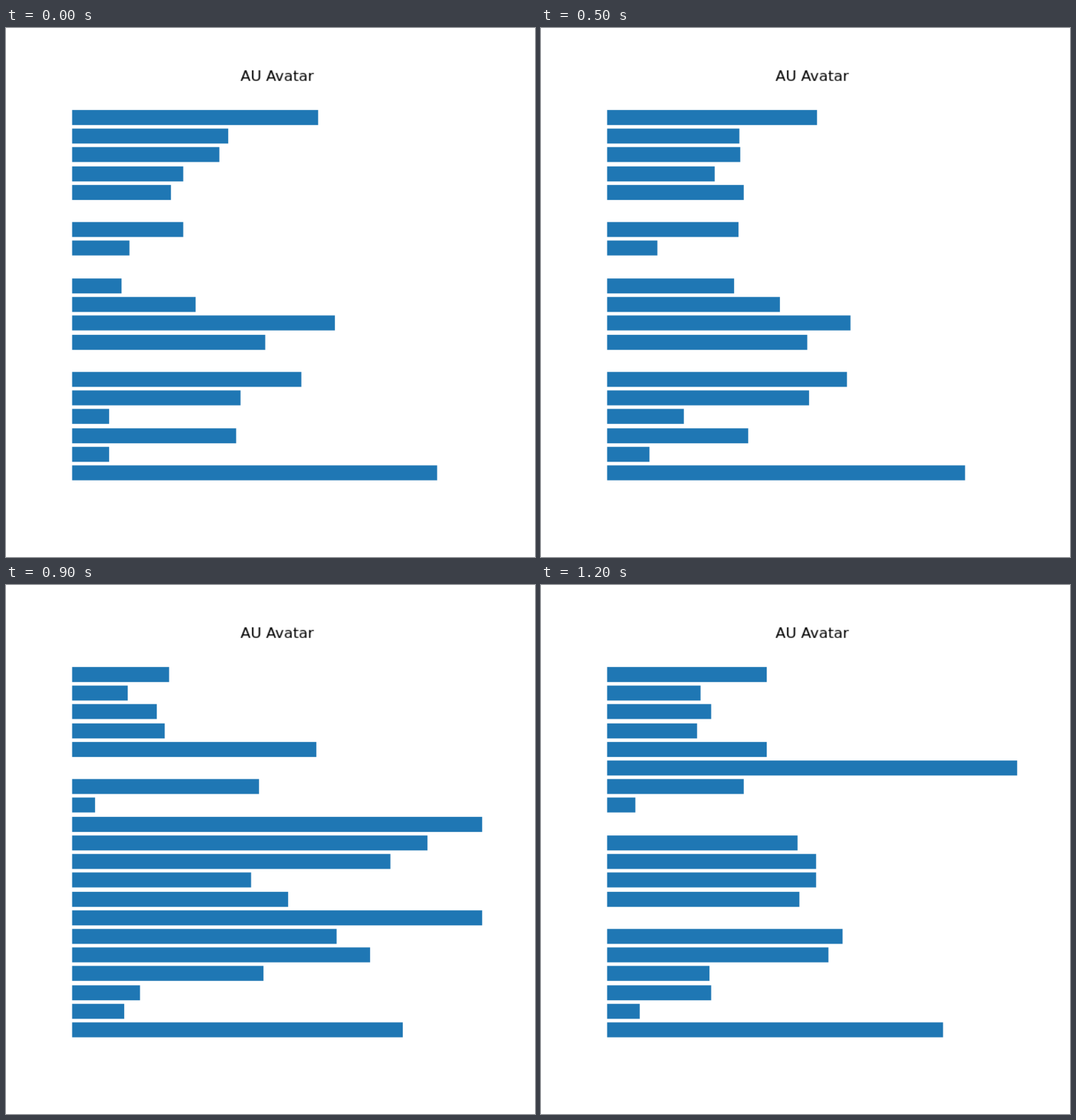
An HTML page with a canvas that plays this animation: 748 px wide and 748 px high, repeating every 1.3 s.

```html
<!DOCTYPE html>
<html lang="en">
<head>
<meta charset="utf-8">
<title>AU Avatar</title>
<style>
  html, body { margin: 0; width: 100%; height: 100%; overflow: hidden; background: #fff; }
  canvas { display: block; }
</style>
</head>
<body>
<canvas id="stage" width="748" height="748"></canvas>
<script>
const SIZE = 600, STEP = 100, STEPS = 13;
const LEFT = 75, WIDTH = 465, TOP = 93, PITCH = 420 / 19.8;

// The plot is drawn small and enlarged, which gives its soft edges
const stage = document.getElementById('stage').getContext('2d');
const plot = document.createElement('canvas');
plot.width = plot.height = SIZE;
const ctx = plot.getContext('2d');

// Graded bars blend between a calm and a smiling pose, in percent of the axis
const graded = (calm, smile) => (blend, sway) => calm + (smile - calm) * blend + sway;
const midway = blend => blend > 0.4 && blend < 0.6 ? 100 : 0;
const smiling = blend => blend === 1 ? 100 : 0;

const bars = [
  graded(58, 23), graded(36, 13), graded(34, 20), graded(25, 22), graded(22, 59),
  midway,
  graded(25, 45), graded(12, 5),
  smiling,
  graded(10, 86), graded(28, 77), graded(62, 43), graded(45, 52),
  smiling,
  graded(54, 64), graded(39, 72), graded(7, 46), graded(38, 16), graded(7, 12), graded(87, 80)
];

const clamp = v => Math.min(1, Math.max(0, v));

function drawBar(row, percent) {
  const y = TOP + row * PITCH;
  const top = Math.round(y);
  const bottom = Math.round(y + PITCH * 0.8);
  ctx.fillRect(LEFT, top, Math.round(WIDTH * percent / 100), bottom - top);
}

function draw(step) {
  ctx.fillStyle = '#fff';
  ctx.fillRect(0, 0, SIZE, SIZE);

  ctx.fillStyle = '#000';
  ctx.font = '16.67px "DejaVu Sans", sans-serif';
  ctx.textAlign = 'center';
  ctx.fillText('AU Avatar', LEFT + WIDTH / 2, 60);

  // Slow rise into the smile, quick release at the end of the loop
  const blend = Math.min(clamp((step - 4) / 4), clamp((STEPS - step) / 2));
  const sway = 2 * Math.cos(step * 2 * Math.PI / 5);
  ctx.fillStyle = '#1f77b4';
  bars.forEach((bar, row) => drawBar(row, bar(blend, sway)));

  stage.drawImage(plot, 0, 0, 748, 748);
}

const start = performance.now();
function tick() {
  const elapsed = Math.max(0, performance.now() - start);
  draw(Math.floor(elapsed / STEP) % STEPS);
  requestAnimationFrame(tick);
}
tick();
</script>
</body>
</html>
```
